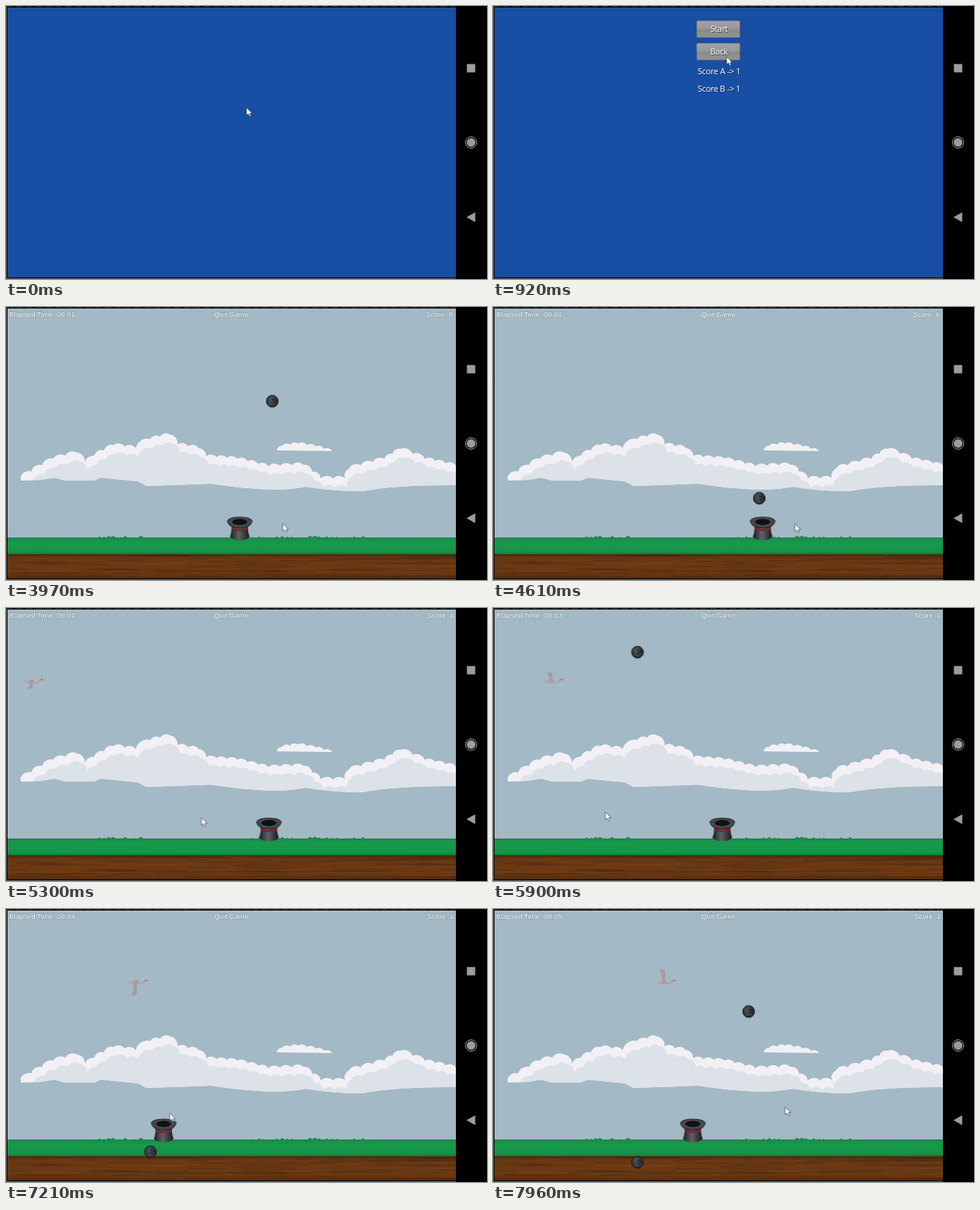
Recreate the animation shown at these times as an HTML page. Size 634 by 360 pixels, loop 8000 ms.

```html
<!DOCTYPE html>
<html lang="en">
<head>
<meta charset="utf-8">
<title>Hat game</title>
<style>
  html, body { margin: 0; width: 100%; height: 100%; overflow: hidden; background: #000; }
  svg { display: block; width: 634px; height: 360px; }
  .ui { font: 11px "Open Sans", "Noto Sans", sans-serif; letter-spacing: -.3px; fill: #fff; text-anchor: middle; }
  .hud { font: 9.45px "Liberation Sans", Arial, sans-serif; fill: #fff;
         stroke: #4a5a64; stroke-opacity: .45; stroke-width: .8px; paint-order: stroke; }
  .shadow { fill: #222; opacity: .75; }
</style>
</head>
<body>
<svg viewBox="0 0 634 360">
  <defs>
    <linearGradient id="gray" x2="0" y2="1">
      <stop offset="0" stop-color="#a3a3a3"/><stop offset=".48" stop-color="#989898"/>
      <stop offset=".52" stop-color="#8b8b8b"/><stop offset="1" stop-color="#929292"/>
    </linearGradient>
    <linearGradient id="red" x2="0" y2="1">
      <stop offset="0" stop-color="#b04646"/><stop offset="1" stop-color="#a83f3f"/>
    </linearGradient>
    <linearGradient id="grass" x2="0" y2="1">
      <stop offset="0" stop-color="#1a8c4a"/><stop offset=".3" stop-color="#17994b"/>
      <stop offset=".85" stop-color="#149447"/><stop offset="1" stop-color="#127a3a"/>
    </linearGradient>
    <linearGradient id="dirt" x2="0" y2="1">
      <stop offset="0" stop-color="#4a280d"/><stop offset=".15" stop-color="#673713"/>
      <stop offset=".7" stop-color="#6c3a14"/><stop offset="1" stop-color="#4f290c"/>
    </linearGradient>
    <linearGradient id="felt">
      <stop offset="0" stop-color="#1b1c1e"/><stop offset=".45" stop-color="#606366"/>
      <stop offset="1" stop-color="#17181a"/>
    </linearGradient>
    <radialGradient id="iron" cx=".4" cy=".4">
      <stop offset="0" stop-color="#4d5457"/><stop offset="1" stop-color="#2a2e31"/>
    </radialGradient>
    <clipPath id="screen"><rect x="2" y="2" width="591" height="356"/></clipPath>
    <clipPath id="edge"><path class="cloud"/></clipPath>
    <g id="ball">
      <circle r="7.800" fill="url(#iron)" stroke="#17191b"/>
      <path d="M-5 -2Q-3 -6 1 -5.500M-4 4Q0 6 4 3" fill="none" stroke="#626a6d" stroke-width=".7"/>
      <path d="M1 -2h0M4 -1h0M2 2h0" stroke="#15181a" stroke-width="2" stroke-linecap="round"/>
    </g>
  </defs>

  <rect width="634" height="360"/>
  <path d="M.5 0V359.500H593" fill="none" stroke="#6a6a6a"/>
  <path d="M0 .5H593" stroke="#3a3735" stroke-dasharray="9 4"/>

  <g clip-path="url(#screen)">
    <rect width="593" height="360" fill="#184ea3"/>
    <g id="menu"></g>
    <g id="scores"></g>

    <g id="game">
      <rect width="593" height="306" fill="#a3b9c5"/>
      <path class="cloud" fill="#f2f0f5"/>
      <path class="cloud" fill="#dce2e7" transform="translate(3 12)" clip-path="url(#edge)" style="clip-path: none" visibility="hidden"/>
      <g clip-path="url(#edge)"><path class="cloud" fill="#dce2e7" transform="translate(3 12)"/></g>
      <rect y="304" width="593" height="22" fill="url(#grass)"/>
      <rect y="304" width="593" height="1" fill="#2c7355"/>
      <rect y="326" width="593" height="33" fill="url(#dirt)"/>
      <g id="grain" fill="none"></g>
      <g id="tufts" fill="#1a8a49"></g>

      <g id="bird">
        <path d="M0 0Q4 -1 8 0Q15 3 20 0Q22 -3 25 -3L27 -1.500Q24 0 22 2Q16 4.500 7 3L2 1Z" fill="#afa3a5"/>
        <path d="M25.500 -3L31 -1.500L25.500 -.2Z" fill="#d8a52b"/>
        <circle cx="25" cy="-2" r=".7" fill="#4b4144"/>
        <path id="wing" d="M9 2L9 -8L6 -17Q11 -17 13 -14V-4L16 2Z" fill="#a89a9d"/>
      </g>
      <g id="balls"></g>

      <g id="hat">
        <path d="M-11 286Q-10 296 -13 303Q-9 307.500 0 307.500Q9 307.500 13 303Q10 296 11 286Z" fill="url(#felt)"/>
        <path d="M-11 290Q0 296 11 290V293Q0 298 -11 293Z" fill="#7f2430"/>
        <path d="M-16.500 282Q-14 277 0 277Q14 277 16.500 282Q15 289 8 290.500Q0 292 -8 290.500Q-15 289 -16.500 282Z" fill="#43464a" stroke="#1c1d20" stroke-width=".8"/>
        <ellipse cy="283.500" rx="10.500" ry="4.700" fill="#101113" stroke="#686c70" stroke-width=".7"/>
      </g>

      <g class="hud" id="hud">
        <text x="4.500" y="13">Elapsed Time: 00:0</text>
        <text x="274.300" y="13">Quit Game</text>
      </g>
    </g>

    <path id="cursor" d="M0 0V10L2.400 8L4 11.500L5.800 10.700L4.300 7.400H7.500Z" fill="#fff" stroke="#27313d" stroke-width=".6"/>
  </g>

  <g fill="#9c9c9c">
    <rect x="607.500" y="76.500" width="11" height="11"/>
    <circle cx="613" cy="180" r="5.800"/>
    <circle cx="613" cy="180" r="7.500" fill="none" stroke="#9c9c9c"/>
    <path d="M607 278.500L618.500 272V285Z"/>
  </g>
</svg>

<script>
const LOOP = 8000, SCORES = 860, MENU = 1750, GAME = 2910, CAUGHT = 4750;
const $ = id => document.getElementById(id);

function add(parent, tag, attrs, text = '') {
  const el = document.createElementNS('http://www.w3.org/2000/svg', tag);
  for (const k in attrs) el.setAttribute(k, attrs[k]);
  el.textContent = text;
  parent.append(el);
  return el;
}

const play = (el, frames) => el.animate(frames, { duration: LOOP, iterations: Infinity });
const pose = (ms, x, y, easing = 'linear') =>
  ({ offset: ms / LOOP, transform: `translate(${x}px, ${y}px)`, easing });

// Visible only within the given [from, to] spans
function show(el, ...spans) {
  const key = (ms, opacity) => ({ offset: ms / LOOP, opacity, easing: 'step-end' });
  const keys = spans.flatMap(([from, to]) => [key(from, 1), key(to, 0)]);
  play(el, [key(0, 0), ...keys, key(LOOP, 0)]);
}

// Rest at a point, then ease to the next; stops: [leave, arrive, x, y]
function glide(el, x, y, stops) {
  const frames = [pose(0, x, y)];
  for (const [leave, arrive, nx, ny] of stops) {
    frames.push(pose(leave, x, y, 'ease-in-out'), pose(arrive, nx, ny));
    [x, y] = [nx, ny];
  }
  play(el, [...frames, pose(LOOP, x, y)]);
}

// Constant speed (px/s), reversing at each turn
function pace(el, x, speed, turns) {
  const frames = [pose(0, x, 0)];
  turns.forEach((ms, i) => {
    frames.push(pose(ms, x, 0));
    x += speed * ((turns[i + 1] ?? LOOP) - ms) / 1000;
    speed = -speed;
  });
  play(el, [...frames, pose(LOOP, x, 0)]);
}

function label(parent, str, y) {
  add(parent, 'text', { class: 'ui shadow', x: 298.8, y: y + 1 }, str);
  add(parent, 'text', { class: 'ui', x: 298, y }, str);
}

function button(parent, row, str, width, press) {
  const y = 19.3 + row * 29.6;
  const box = { x: 297 - width / 2, y, width, height: 22.5, rx: 1.5, stroke: '#4b5566', 'stroke-width': .6 };
  add(parent, 'rect', { ...box, fill: 'url(#gray)' });
  if (press) show(add(parent, 'rect', { ...box, fill: 'url(#red)' }), press);
  label(parent, str, y + 15);
}

// Menu and score screens
button($('menu'), 0, 'Start', 65.4, [2300, GAME]);
button($('menu'), 1, 'Scores', 65.4, [560, 810]);
button($('menu'), 2, 'Quit', 65.4);
button($('scores'), 0, 'Start', 57.4);
button($('scores'), 1, 'Back', 57.4, [1690, MENU]);
label($('scores'), 'Score A -> 1', 90);
label($('scores'), 'Score B -> 1', 113);
show($('menu'), [0, SCORES], [MENU, GAME]);
show($('scores'), [SCORES, MENU]);
show($('game'), [GAME, LOOP]);

// Clouds: round puffs of about one size along a ridge
function puffs(ridge, size) {
  let [x, y] = ridge[0], d = `M${x} ${y}`;
  for (const [nx, ny] of ridge.slice(1)) {
    const len = Math.hypot(nx - x, ny - y), n = Math.max(1, Math.round(len / size)), r = len / n * .7;
    for (let i = 1; i <= n; i++) d += `A${r} ${r} 0 0 1 ${x + (nx - x) * i / n} ${y + (ny - y) * i / n}`;
    [x, y] = [nx, ny];
  }
  return d;
}
const cloud = puffs([[19, 225], [62, 200], [94, 192], [104, 206], [116, 196], [142, 182], [171, 186],
    [190, 174], [216, 168], [226, 181], [254, 186], [264, 197], [305, 200], [346, 210], [392, 208],
    [415, 226], [447, 226], [452, 213], [499, 200], [520, 187], [552, 200], [593, 209]], 16)
  + 'V235Q520 234 470 243Q430 243 395 237Q355 246 270 233L185 236L174 230L125 225L116 229L78 229L64 225L46 228L20 229Z'
  + puffs([[357, 189], [364, 183], [385, 180], [408, 184], [430, 190]], 11) + 'Z';
document.querySelectorAll('.cloud').forEach(p => p.setAttribute('d', cloud));

// Ground texture
let seed = 7;
const rnd = (lo, hi) => lo + (seed = seed * 16807 % 2147483647) / 2147483647 * (hi - lo);
for (let i = 0; i < 90; i++) {
  const w = rnd(20, 110);
  add($('grain'), 'path', {
    d: `M${rnd(0, 590)} ${rnd(328, 357)}q${w / 2} ${rnd(-1.5, 1.5)} ${w} 0`,
    stroke: i % 5 < 3 ? '#47230a' : '#7b4519', 'stroke-width': .8, opacity: .6
  });
}
for (const [from, to] of [[112, 178], [318, 374], [396, 480]])
  for (let x = from; x < to; x += 6)
    add($('tufts'), 'path', { d: `M${x} 305l${rnd(2, 6)} ${-rnd(1, 3.5)}l6 3.5z` });

// Balls fall at one speed and rest on the floor
const FALL = 200, FLOOR = 334, TOP = -8;
for (const [x, enter, gone] of [[351, 3310, CAUGHT], [190.5, 5570, LOOP], [337, 7245, LOOP]]) {
  const ball = add($('balls'), 'use', { href: '#ball' });
  const stop = Math.min(LOOP, enter + (FLOOR - TOP) / FALL * 1000);
  const y = TOP + (stop - enter) / 1000 * FALL;
  play(ball, [pose(0, x, TOP), pose(enter, x, TOP), pose(stop, x, y), pose(LOOP, x, y)]);
  show(ball, [enter, gone]);
}

pace($('hat'), 298, 74, [3835, 4896, 7193]);
play($('bird'), [pose(0, -359.6, 96), pose(LOOP, 216.4, 96)]);
$('wing').animate({ transform: ['scaleY(1)', 'scaleY(-1.1)'] },
  { duration: 250, direction: 'alternate', easing: 'ease-in-out', iterations: Infinity, delay: -30 });
glide($('cursor'), 317, 134, [
  [50, 560, 308, 67], [1070, 1150, 308, 88], [1300, 1540, 307, 60], [2000, 2250, 301, 28],
  [2340, 2560, 331, 85], [2580, 2850, 297, 154], [2950, 3500, 297, 285], [3550, 4250, 398, 286],
  [4650, 5865, 148, 269], [5865, 6900, 157, 272], [7000, 7600, 385, 261]
]);

// Counters
for (let s = 0; s < 6; s++) {
  const start = 2660 + s * 1000;
  show(add($('hud'), 'text', { x: 85.9, y: 13 }, s), [Math.max(GAME, start), Math.min(LOOP, start + 1000)]);
}
show(add($('hud'), 'text', { x: 553.5, y: 13 }, 'Score: 0'), [GAME, CAUGHT]);
show(add($('hud'), 'text', { x: 555.2, y: 13 }, 'Score: 1'), [CAUGHT, LOOP]);
</script>
</body>
</html>
```
